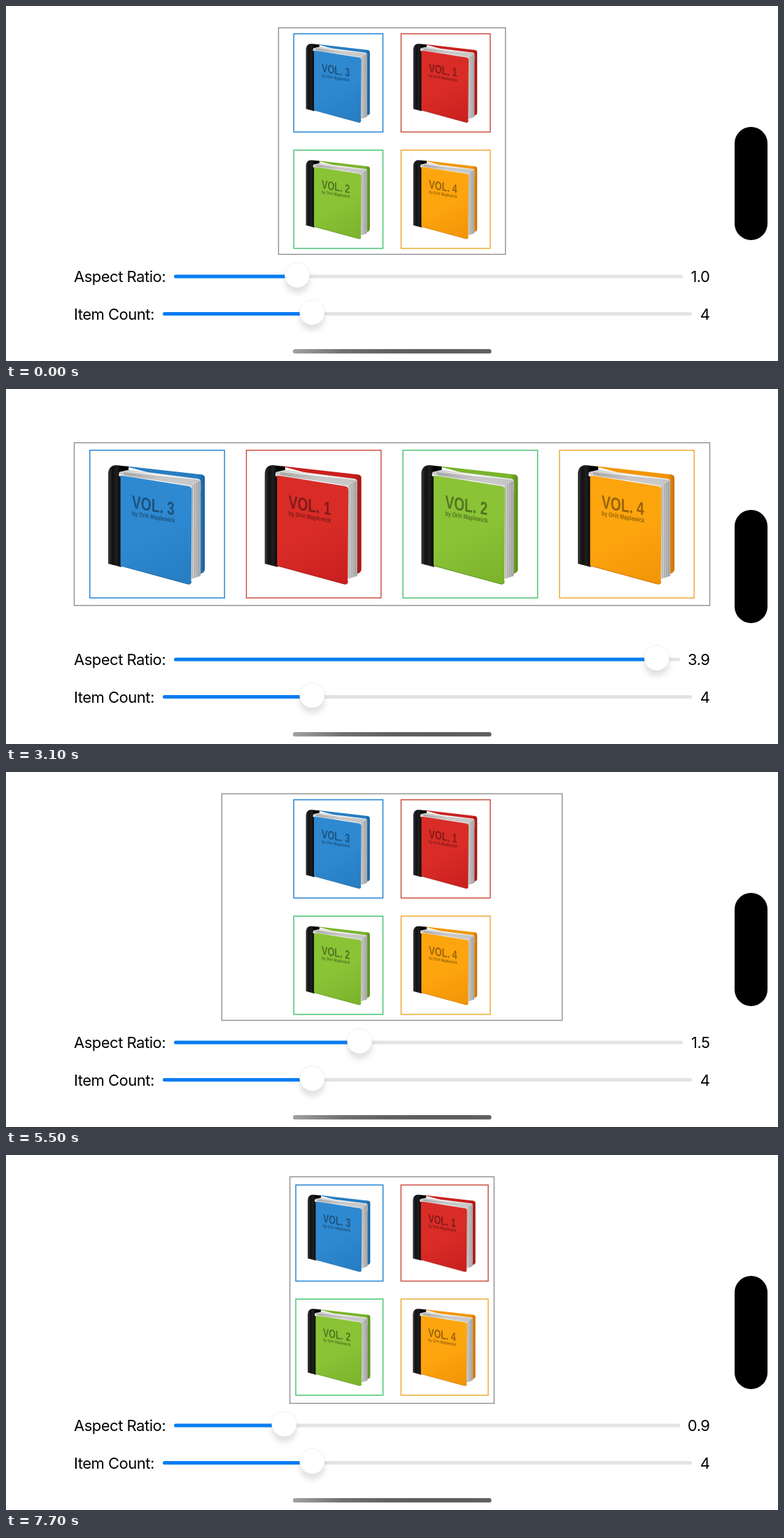
An HTML page with a canvas for the animation above (7800 ms loop, 1103x508 px).

```html
<!DOCTYPE html>
<html>
<head>
<meta charset="utf-8">
<style>
  html, body { margin: 0; width: 100%; height: 100%; overflow: hidden; background: #fff; }
  canvas { display: block; }
</style>
</head>
<body>
<canvas id="stage" width="1103" height="508"></canvas>
<script>
const ctx = document.getElementById('stage').getContext('2d');
const AREA = { cx: 551.5, cy: 193.3, w: 908, h: 324.2 };
const BOOKS = [
  { vol: 3, line: '#1a7fd3', light: '#2e89d1', mid: '#267dc2', dark: '#17629f' },
  { vol: 1, line: '#cb4636', light: '#d92c27', mid: '#c9201e', dark: '#a31614' },
  { vol: 2, line: '#3fc06c', light: '#8ac335', mid: '#7bb42c', dark: '#568b19' },
  { vol: 4, line: '#eba62c', light: '#fda50e', mid: '#f29506', dark: '#c97002' }
];

function fill(path, style) {
  ctx.fillStyle = style;
  ctx.fill(new Path2D(path));
}

function pill(x, y, w, h, style) {
  ctx.fillStyle = style;
  ctx.beginPath();
  ctx.roundRect(x, y, w, h, Math.min(w, h) / 2);
  ctx.fill();
}

function ramp(x0, y0, x1, y1, ...colors) {
  const g = ctx.createLinearGradient(x0, y0, x1, y1);
  colors.forEach((c, i) => g.addColorStop(i / (colors.length - 1), c));
  return g;
}

function frame(x, y, w, h, color) {
  ctx.strokeStyle = color;
  ctx.lineWidth = 1.4;
  ctx.strokeRect(x, y, w, h);
}

// Drawn in a cell 198 units wide
function drawBook(x, y, w, book) {
  ctx.save();
  ctx.translate(x, y);
  ctx.scale(w / 198, w / 198);

  // back cover, page tops, page edges
  fill('M50 23L165 36Q169 37 169 41V176Q168 182 160 182L150 183V50Z', ramp(158, 0, 169, 0, book.mid, book.dark));
  fill('M38 34L58 29L160 42Q163 43 163 47V60H146Z', ramp(40, 0, 163, 0, '#c4c4c4', '#f2f2f2', '#dedede'));
  fill('M146 54L163 44V185L148 190Z', ramp(148, 0, 163, 0, '#e2e2e2', '#c2c2c2', '#a8a8a8'));
  ctx.strokeStyle = '#979797';
  ctx.lineWidth = 0.8;
  for (let i = 0; i < 4; i++) {
    const px = 151 + i * 3;
    ctx.beginPath();
    ctx.moveTo(50, 36 - i);
    ctx.lineTo(px, 51 - i * 2);
    ctx.lineTo(px, 189 - i);
    ctx.stroke();
  }

  // spine and front cover
  fill('M27 167V34Q28 22 39 22L57 24L57 29L44 32Q42 33 43 38L46 39V172Z', ramp(27, 0, 46, 0, '#3a3a3a', '#111', '#202020', '#000'));
  fill('M45 37L146 53Q150 54 150 59L149 193Q149 198 144 197L45 170Z', ramp(60, 40, 140, 195, book.light, book.light, book.mid));
  ctx.strokeStyle = book.dark;
  ctx.lineWidth = 1;
  ctx.stroke(new Path2D('M45 170L144 197Q149 198 149 193'));

  // title follows the slant of the cover
  ctx.transform(0.73, 0.125, 0, 1, 62, 85);
  ctx.fillStyle = 'rgba(0,0,0,.4)';
  ctx.textAlign = 'left';
  ctx.letterSpacing = '0px';
  ctx.font = 'bold 27px "Liberation Sans", sans-serif';
  ctx.fillText('VOL. ' + book.vol, 0, 0);
  ctx.font = 'bold 9.8px "Liberation Sans", sans-serif';
  ctx.fillText('by Orin Maplewick', 0, 11);
  ctx.restore();
}

function drawGrid(ratio) {
  const W = Math.min(AREA.w, AREA.h * ratio), H = W / ratio;
  frame(AREA.cx - W / 2, AREA.cy - H / 2, W, H, '#8f8f8f');

  const n = BOOKS.length;
  const cols = Math.min(n, Math.max(1, Math.round(Math.sqrt(n * ratio))));
  const rows = Math.ceil(n / cols);
  // largest cell whose gaps and padding still fit
  const fit = (size, count, k, extra) =>
    (size - 8.4 - extra * count - 15.5 * (count - 1)) / (count * k + 0.082 * (count - 1) + 0.068);
  const w = Math.min(fit(W, cols, 1, 0), fit(H, rows, 1.088, 2)), h = 1.088 * w + 2;
  const gap = 15.5 + 0.082 * w;
  const left = AREA.cx - (cols * (w + gap) - gap) / 2;
  const top = AREA.cy - (rows * (h + gap) - gap) / 2;
  BOOKS.forEach((book, i) => {
    const x = left + (i % cols) * (w + gap);
    const y = top + Math.floor(i / cols) * (h + gap);
    drawBook(x, y, w, book);
    frame(x, y, w, h, book.line);
  });
}

function drawSlider(label, value, y, x0, x1, part) {
  ctx.fillStyle = '#000';
  ctx.font = '22px Inter, sans-serif';
  ctx.letterSpacing = '-0.5px';
  ctx.textAlign = 'left';
  ctx.fillText(label, 97, y + 8);
  ctx.textAlign = 'right';
  ctx.fillText(value, 1005.5, y + 8);

  const thumb = x0 + 15.5 + part * (x1 - x0 - 31);
  pill(x0, y - 2.6, x1 - x0, 5.2, '#e3e3e4');
  pill(x0, y - 2.6, thumb - x0, 5.2, '#067df3');
  ctx.save();
  ctx.shadowColor = 'rgba(0,0,0,.11)';
  ctx.shadowBlur = 7;
  ctx.shadowOffsetY = 8;
  pill(thumb - 18, y - 20, 36, 36, '#fff');
  ctx.restore();
  ctx.strokeStyle = 'rgba(0,0,0,.06)';
  ctx.lineWidth = 1;
  ctx.stroke();
}

function draw() {
  const step = Math.floor(performance.now() / 100) % 78;
  // the ratio runs 0.1 to 4.0 and back, a tenth per step
  const ratio = (1 + Math.abs(39 - (step + 48) % 78)) / 10;
  const value = ratio.toFixed(1);

  ctx.fillStyle = '#fff';
  ctx.fillRect(0, 0, 1103, 508);
  drawGrid(ratio);
  const ones = value.split('1').length - 1;
  drawSlider('Aspect Ratio:', value, 387, 240, 963 + 4 * ones, (ratio - 0.1) / 3.9);
  drawSlider('Item Count:', '4', 440.5, 224, 980, 0.273);
  pill(1041, 173, 47, 162, '#000');
  pill(410, 491, 283.5, 6.3, ramp(410, 0, 693, 0, '#a0a0a0', '#707070', '#606060', '#5c5c5c', '#606060'));
  requestAnimationFrame(draw);
}
draw();
</script>
</body>
</html>
```
